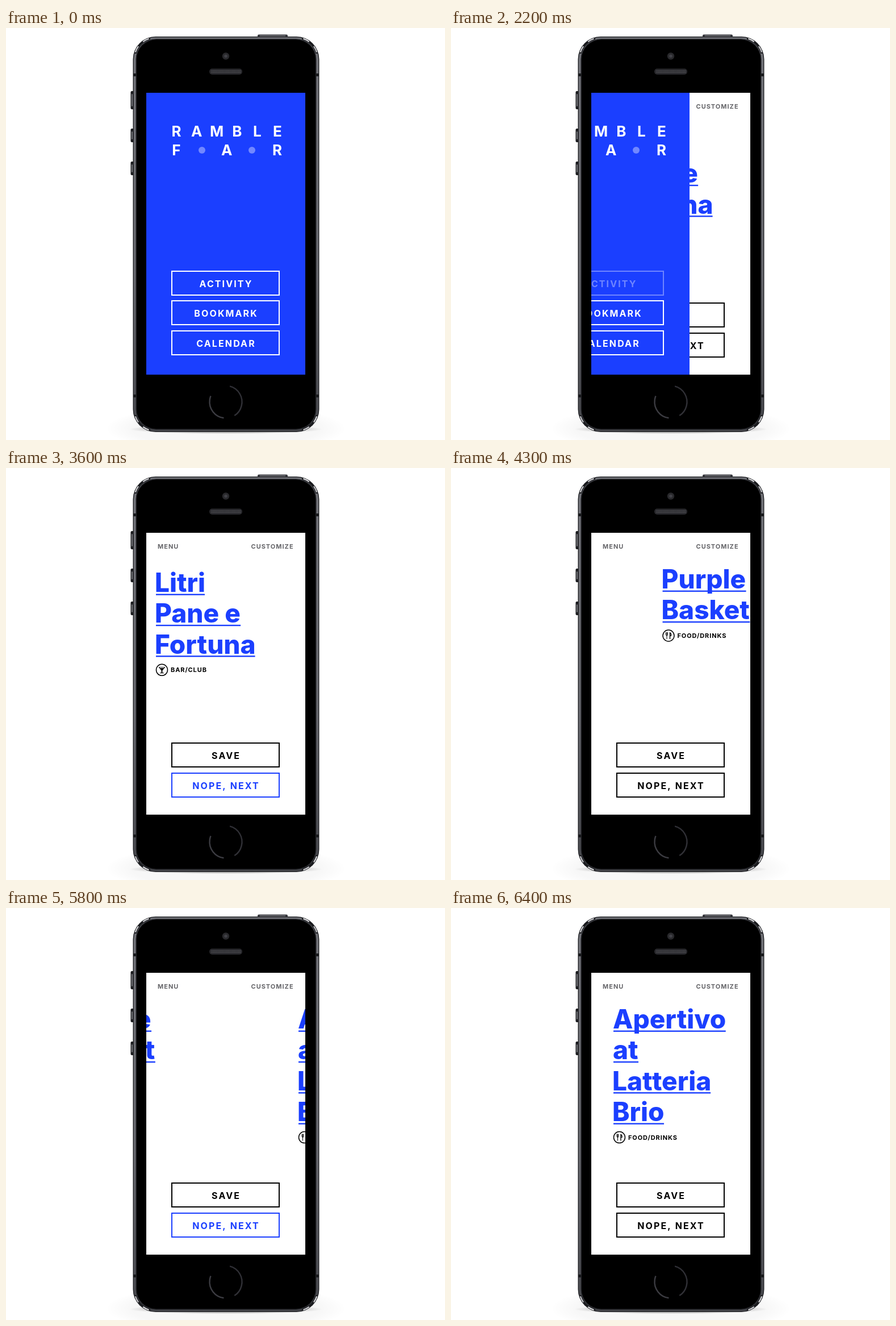
An HTML page with a canvas that plays this animation: 773 px wide and 725 px high, repeating every 7.9 s.

```html
<!DOCTYPE html>
<html lang="en">
<head>
<meta charset="utf-8">
<title>Phone app demo</title>
<style>
html, body { margin: 0; width: 100%; height: 100%; overflow: hidden; background: #fff; }
canvas { display: block; }
</style>
</head>
<body>
<canvas id="stage" width="773" height="725"></canvas>
<script>
const c = document.getElementById('stage').getContext('2d');
const BLUE = '#1b3fff', GREY = '#66666a', LOOP = 7900;
const SCREEN = { x: 247, y: 114, w: 280, h: 496 };
const HOME = 286, PITCH = 406, LINE = 54.3;

const pages = [
  { lines: ['Litri', 'Pane e', 'Fortuna'], y: 218, label: 'BAR/CLUB', icon: glass },
  { lines: ['Purple', 'Basket'], y: 212, label: 'FOOD/DRINKS', icon: cutlery },
  { lines: ['Apertivo', 'at', 'Latteria', 'Brio'], y: 212, label: 'FOOD/DRINKS', icon: cutlery }
];
// Keys of [step, distance]; the second swipe overshoots before settling.
const swipes = [
  { start: 3600, keys: [[0, 0], [1, 22], [4, 177], [8, 319.5], [10, PITCH]] },
  { start: 5500, keys: [[0, 0], [1, 22], [4, 177], [8, 364], [9, 414], [10, PITCH]] }
];

function setFont(size, spacing = 0, weight = 700) {
  c.font = `${weight} ${size}px Inter, "Open Sans", sans-serif`;
  c.letterSpacing = spacing + 'px';
}

function text(str, x, y, size, color, spacing = 0, centered = false) {
  setFont(size, spacing);
  c.fillStyle = color;
  const shift = centered ? (c.measureText(str).width - spacing) / 2 : 0;
  c.fillText(str, x - shift, y);
}

function fillRound(x, y, w, h, r, fill) {
  c.beginPath();
  c.roundRect(x, y, w, h, r);
  c.fillStyle = fill;
  c.fill();
}

function disc(x, y, r, fill) {
  c.beginPath();
  c.arc(x, y, r, 0, 7);
  c.fillStyle = fill;
  c.fill();
}

function arc(x, y, r, from, to, color, width) {
  c.beginPath();
  c.arc(x, y, r, from * Math.PI, to * Math.PI);
  c.strokeStyle = color;
  c.lineWidth = width;
  c.stroke();
}

function path(d, color, width) {
  c.strokeStyle = color;
  c.lineWidth = width;
  c.stroke(new Path2D(d));
}

function button(label, y, color) {
  c.strokeStyle = color;
  c.lineWidth = 2;
  c.strokeRect(292, y, 189, 42);
  text(label, 386.5, y + 28, 16, color, 2.1, true);
}

function glass() {
  c.fillStyle = '#000';
  c.fill(new Path2D('M-6-5H6L1 1V5H3.5V6H-3.5V5H-1V1Z'));
  path('M-3.5-3.8H3.5', '#fff', 1);
}

function cutlery() {
  path('M-4.5-6V-2Q-4.5 0-3 0T-1.5-2V-6M-3-6V6', '#000', 1);
  path('M2.5 6V-5Q5-4 4.5 0H2.5', '#000', 1.4);
}

function glow(y, flat, inner, outer, alpha) {
  c.save();
  c.translate(387, y);
  c.scale(1, flat);
  const g = c.createRadialGradient(0, 0, inner, 0, 0, outer);
  g.addColorStop(0, `rgba(0,0,0,${alpha})`);
  g.addColorStop(1, 'rgba(0,0,0,0)');
  c.fillStyle = g;
  c.fillRect(-outer, -outer, 2 * outer, 2 * outer);
  c.restore();
}

function phone() {
  glow(705, 0.2, 165, 212, 0.03);
  glow(706, 0.05, 120, 170, 0.22);
  for (const [y, h] of [[111, 32], [177, 24], [235, 24]]) {
    fillRound(219.5, y, 6, h, 2, '#1c1d20');
    fillRound(221, y + 5, 2, h - 10, 1, '#77787d');
  }
  fillRound(443, 11.5, 53, 7, 2, '#34353a');
  fillRound(447, 13, 45, 1.5, 0, '#77787d');

  const rim = c.createLinearGradient(0, 15, 0, 711);
  rim.addColorStop(0, '#74757b');
  rim.addColorStop(0.6, '#68696f');
  rim.addColorStop(1, '#45464b');
  fillRound(223.5, 15, 328, 696, 40, '#26272b');
  fillRound(225, 16.5, 325, 693, 38.5, rim);
  fillRound(228.5, 19, 318, 688, 36, '#26272b');
  fillRound(230, 20.5, 315, 685, 34.5, '#000');
  for (const y of [80, 645]) {
    c.fillStyle = '#17181b';
    c.fillRect(224, y, 5, 5);
    c.fillRect(546, y, 5, 5);
  }
  // Light caught on the bevelled corners.
  for (const [x, y, turn] of [[263, 54, 1], [512, 54, 1.5], [512, 672, 0], [263, 672, 0.5]]) {
    arc(x, y, 36.5, turn + 0.08, turn + 0.42, '#1a1b1e', 3.5);
    arc(x, y, 37, turn + 0.1, turn + 0.2, '#e2e2e5', 2);
    arc(x, y, 37, turn + 0.3, turn + 0.4, '#d2d2d6', 2);
  }

  disc(387, 49.5, 6.2, '#29292c');
  disc(387, 49.5, 2.8, '#414147');
  fillRound(358, 71.5, 58, 10.5, 5, '#29292d');
  for (let i = 0; i < 24; i++)
    for (let j = 0; j < 2; j++) disc(362 + i * 2.2, 75.5 + j * 2.8, 0.7, '#68686d');
  arc(387, 658, 28.5, 1.58, 2.32, '#303036', 2.4);
  arc(387, 658, 28.5, 0.54, 1.12, '#3c3c42', 2.4);
}

function menu(t) {
  c.fillStyle = BLUE;
  c.fillRect(SCREEN.x, SCREEN.y, SCREEN.w, SCREEN.h);
  [...'RAMBLE'].forEach((ch, i) => text(ch, 300 + i * 35.6, 191, 26, '#fff', 0, true));
  [...'FAR'].forEach((ch, i) => text(ch, 300 + i * 88.8, 224, 26, '#fff', 0, true));
  disc(345, 215, 6, '#7288ff');
  disc(433, 215, 6, '#7288ff');
  button('ACTIVITY', 428, t < 1500 ? '#fff' : '#6f85ff');
  button('BOOKMARK', 480, '#fff');
  button('CALENDAR', 533, '#fff');
}

function drawPage({ lines, y, label, icon }, x) {
  setFont(46, 0, 800);
  c.fillStyle = BLUE;
  lines.forEach((line, i) => {
    const base = y + i * LINE;
    const { actualBoundingBoxLeft: left, actualBoundingBoxRight: right } = c.measureText(line);
    c.fillText(line, x + left, base);
    c.fillRect(x, base + 3.5, left + right + 1, 2.4);
  });
  const iconY = y + (lines.length - 1) * LINE + 28.7;
  arc(x + 10.5, iconY, 10, 0, 2, '#000', 1.5);
  c.save();
  c.translate(x + 10.5, iconY);
  icon();
  c.restore();
  text(label, x + 26, iconY + 4, 11, '#000', 0.9);
}

const stepsSince = (t, start) => Math.max(0, Math.floor((t - start) / 100) + 1);

function distance({ start, keys }, t) {
  const k = Math.min(10, stepsSince(t, start));
  const i = Math.max(1, keys.findIndex(key => key[0] >= k));
  const [k0, d0] = keys[i - 1], [k1, d1] = keys[i];
  return d0 + (d1 - d0) * (k - k0) / (k1 - k0);
}

function list(t) {
  c.fillStyle = '#fff';
  c.fillRect(SCREEN.x, SCREEN.y, SCREEN.w, SCREEN.h);
  text('MENU', 267, 142, 11, GREY, 1);
  text('CUSTOMIZE', 431.5, 142, 11, GREY, 1);
  const moved = swipes.reduce((sum, s) => sum + distance(s, t), 0);
  pages.forEach((p, i) => drawPage(p, HOME + i * PITCH - moved));
  const pressed = (t >= 3100 && t < 4300) || (t >= 5000 && t < 6200);
  button('SAVE', 484, '#000');
  button('NOPE, NEXT', 537, pressed ? BLUE : '#000');
}

function draw(t) {
  c.fillStyle = '#fff';
  c.fillRect(0, 0, 773, 725);
  phone();
  c.save();
  c.beginPath();
  c.rect(SCREEN.x, SCREEN.y, SCREEN.w, SCREEN.h);
  c.clip();
  const step = stepsSince(t, 2000);
  if (step) list(t);
  if (step < 7) {
    c.translate(step && 22 - step * 43, 0);
    menu(t);
  }
  c.restore();
}

const begin = performance.now();
function tick() {
  draw((performance.now() - begin) % LOOP);
  requestAnimationFrame(tick);
}
tick();
</script>
</body>
</html>
```
